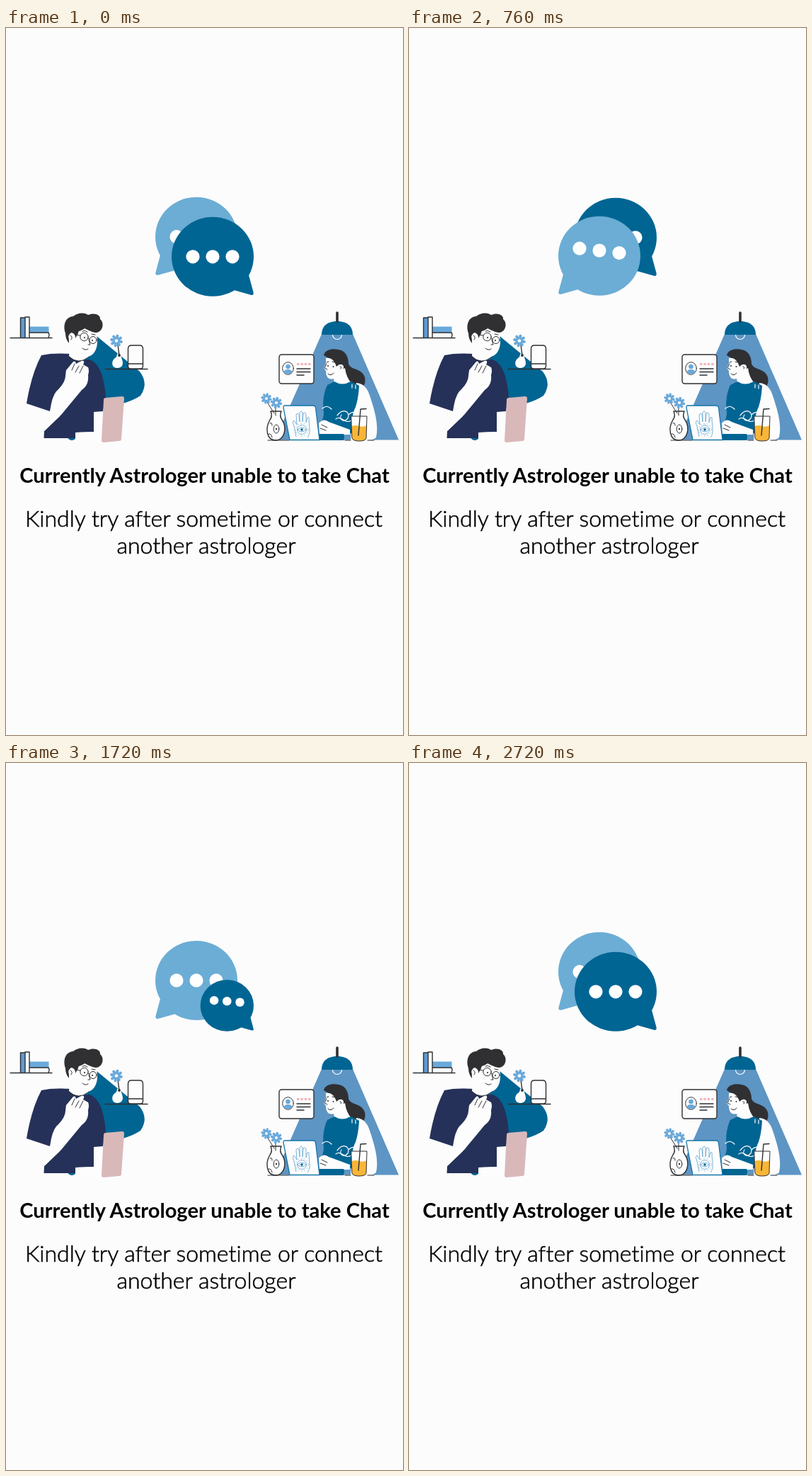
Recreate the animation shown at these times as an HTML page. Size 561 by 998 pixels, loop 2.76 s.

```html
<!DOCTYPE html>
<html lang="en">
<head>
<meta charset="utf-8">
<title>Astrologer unavailable</title>
<style>
  html, body { margin: 0; width: 100%; height: 100%; overflow: hidden; background: #fcfcfc; }
  svg { display: block; width: 100%; height: 100%; }
  text { font-family: Lato, sans-serif; font-variant-ligatures: none; text-anchor: middle; fill: #000; }
  .light { font-weight: 300; stroke: #000; stroke-width: .55; }
  .ink { fill: none; stroke: #2f3033; stroke-width: 1.4; stroke-linecap: round; stroke-linejoin: round; }
  .thin { stroke-width: 1; }
  .paper { fill: #fdfdfd; }
  .hair { fill: #303033; }
  .navy { fill: #253158; }
  .teal { fill: #006593; }
  .sky { fill: #69a9db; }
</style>
</head>
<body>
<svg viewBox="0 0 561 998" xmlns="http://www.w3.org/2000/svg">
  <defs>
    <g id="flower">
      <g id="petals" stroke="#69a9db" stroke-width="4" stroke-linecap="round"></g>
      <circle class="sky" r="4.6"/>
      <circle class="paper" r="2.3"/>
    </g>
  </defs>
  <rect width="561" height="998" fill="#fcfcfc"/>

  <g id="bubbles"></g>

  <g id="man">
    <!-- book shelf -->
    <rect x="20.5" y="409" width="6.500" height="28" fill="#5e9bd3"/>
    <rect class="sky" x="33" y="421.500" width="27.500" height="8.500"/>
    <path class="ink" d="M6 437.500H65M20.500 437V409H27V437M27 408H33V437M33 430H60Q62 433 60 437"/>
    <!-- backdrop -->
    <path class="teal" d="M127 434L189 485Q202 502 190 519Q172 531 139 535L108 468Z"/>
    <path class="teal" d="M87 578H99Q97 582 93 582Q89 582 87 578Z"/>
    <!-- side table -->
    <path class="paper" d="M157 460H163Q162 464 164 468C167 476 163 480 157 480C149 480 148 470 154 466Q157 464 157 460Z"/>
    <rect class="paper" x="172.500" y="448" width="21" height="33" rx="4"/>
    <path class="ink" d="M140 481.500H200M158 447L160 462M172.500 474H193.500M177 448H189Q193.500 448 193.500 453V477Q193.500 481 190 481H176Q172.500 481 172.500 477V453Q172.500 448 177 448"/>
    <circle class="hair" cx="160" cy="462" r="1.900"/>
    <use href="#flower" transform="translate(156 441.500)"/>
    <!-- body -->
    <path class="navy" d="M50 462C62 459 78 459 90 460L104 469L118 468C133 473 139 495 141 521L137 541L124 542V570L98 571V579H53.500L54 569L76 548L62 541L29 530Q36 488 50 462Z"/>
    <path class="paper" d="M91 441L89 463Q102 476 116 465L115 452Z"/>
    <path class="paper" d="M85 483L95 471Q98 469 99 474L108 469Q112 470 109 475L116 479Q118 483 116 490C117 501 113 507 107 511L78 546L54 569Q60 558 62 541Q65 520 71 513Q84 501 84 491Z"/>
    <path class="ink thin" d="M97 474L93 483M103 477L98 486M109 477L104 487M89 464Q102 476 116 465"/>
    <path class="paper" d="M124 542H139L136 584H98V571L124 570Z"/>
    <!-- head -->
    <path class="paper" d="M88 428Q99 412 128 425L129 443C129 454 123 464 114 464Q100 463 91 447Z"/>
    <path class="hair" d="M84 431C80 419 84 408 95 407C101 402 110 401 116 405C125 401 134 405 133 411C139 416 137 426 131 429C125 432 118 427 111 424C107 428 102 426 102 431L98 438Q97 430 92 430Q88 432 89 445Q84 439 84 431Z"/>
    <circle class="paper" cx="93" cy="436" r="4.800"/>
    <g class="ink thin">
      <circle cx="110.500" cy="436" r="5.700"/>
      <circle cx="123" cy="440.500" r="5"/>
      <path d="M98 433L105 434M116 438L118 439M108 428Q111 426 115 429M121 432L126 433M108 452Q112 456 116 453M91 434Q95 436 92 440M117 440L119 447L116 447"/>
    </g>
    <circle class="hair" cx="111" cy="437" r="1.100"/>
    <circle class="hair" cx="122" cy="441" r="1.100"/>
    <!-- folder -->
    <path d="M141 522L164 520Q167 520 167 523L163 580Q163 583 160 583L138 585Q135 585 135 582L138 525Q138 522 141 522Z" fill="#d9b8ba"/>
  </g>

  <g id="woman">
    <!-- lamp -->
    <path d="M446 432H490L555 581.500H380Z" fill="#5d95c4"/>
    <circle cx="468" cy="433" r="6.500" fill="#5d95c4" stroke="#fdfdfd" stroke-width="1.200"/>
    <path class="teal" d="M446 433C446 420 455 414 468 414C481 414 490 420 490 433Z"/>
    <path d="M468 402V414" stroke="#303033" stroke-width="3.600" stroke-linecap="round"/>
    <!-- profile card -->
    <rect class="ink" x="386" y="461" width="49" height="41" rx="3.500" style="fill:#fdfdfd"/>
    <ellipse class="ink thin" cx="398.500" cy="480.500" rx="7.800" ry="8.800" style="fill:#fdfdfd"/>
    <circle class="sky" cx="398.500" cy="478" r="3.300"/>
    <path class="sky" d="M392.500 486Q393 482 398.500 482Q404 482 404.500 486Q399 491 392.500 486Z"/>
    <path d="M411 474.500H431" stroke="#f3b3bc" stroke-width="3.200" stroke-dasharray="3.400 2"/>
    <path class="ink" d="M411 481H430M411 485.500H430M411 490H421"/>
    <!-- figure -->
    <path class="hair" d="M449 462C451 454 461 452 470 454C481 456 484 466 484 474C488 484 502 479 507 493C509 503 505 509 496 508L466 500L462 470Z"/>
    <path class="paper" d="M495 501Q509 502 514 519C521 540 527 560 523 578Q519 582 509 582H487L488 560Z"/>
    <path class="teal" d="M454 504L464 499H488L499 505Q498 523 494 535Q488 546 488 572L479 573L444 560Q449 551 449 543Q446 521 454 504Z"/>
    <path class="paper" d="M462 488L464 501Q475 508 488 501Q481 494 479 480Z"/>
    <path class="paper" d="M452 466Q460 464 465 473L467 478Q473 472 477 477Q478 483 472 484C470 493 464 497 457 495Q452 493 452 484L449 480L452 474Z"/>
    <path class="teal" d="M464 499Q475 506 487 499L490 503Q477 511 463 504Z"/>
    <path class="ink thin" d="M453 472L456 471M461 471L465 472M453 474L450 480L454 482M455 488Q459 492 463 487M472 478Q475 478 473 481"/>
    <circle class="hair" cx="455" cy="477" r="1"/>
    <circle class="hair" cx="462.500" cy="478" r="1"/>
    <g fill="none" stroke="#fdfdfd" stroke-width="1.200" stroke-linecap="round">
      <path d="M447 537Q454 531 460 538M466 552C474 546 479 560 488 554M468 547C476 536 487 541 483 551C477 558 470 552 474 546M484 546Q489 541 494 543M489 503V508M494 504V509"/>
    </g>
    <path class="paper" d="M442 558Q449 550 456 556L486 567V574H443Z"/>
    <path class="ink thin" d="M446 560L454 564M444 565L452 568"/>
    <path class="teal" d="M438 573H477Q479 577 477 582H438Z"/>
    <!-- drink -->
    <path class="paper" d="M488 548H510L509 579Q508 583 499 583Q490 583 489 579Z"/>
    <path d="M488.500 562Q494 560 499 562Q505 564 509.500 561L509 579Q508 583 499 583Q490 583 489 579Z" fill="#f9b537"/>
    <path class="ink thin" d="M488 548H510L509 579Q508 583 499 583Q490 583 489 579Z"/>
    <path class="ink" d="M498 575L501 538L509 537.500"/>
    <!-- vase -->
    <path class="ink" style="fill:#fdfdfd" d="M374 541H389Q386 548 390 553C398 565 393 582 381 582C368 582 366 565 373 553Q377 548 374 541Z"/>
    <path class="ink thin" d="M369 528L379 544M381 536V547M371 573Q375 572 376 578M373 558Q376 556 376 561"/>
    <ellipse class="ink thin" cx="382" cy="566" rx="3.800" ry="6"/>
    <circle class="hair" cx="382" cy="566" r="1.200"/>
    <use href="#flower" transform="translate(368 523) scale(.86)"/>
    <use href="#flower" transform="translate(382 529) scale(.92)"/>
    <!-- laptop -->
    <path d="M394 533H434Q437 533 437.500 536L443 581.500H401L392 536Q391.500 533 394 533Z" fill="#fdfdfd" stroke="#1576a9" stroke-width="1.300"/>
    <g fill="none" stroke="#6ba9d2" stroke-width=".9">
      <path d="M410 577L407 562Q404 555 407 554L411 560L410 546Q412 542 414 546L415 556V543Q417 539 419 543V556L420 544Q423 541 424 546L424 557L426 550Q429 548 428 553L429 565Q430 573 426 578"/>
      <circle cx="418" cy="567" r="6.500"/>
      <circle cx="418" cy="567" r="9" stroke-dasharray="1.500 3"/>
      <path d="M412 567Q418 561 424 567Q418 573 412 567"/>
    </g>
    <circle class="teal" cx="418" cy="567" r="1.800"/>
    <path class="ink thin" d="M370 582H400M479 582H487M511 582H520"/>
  </g>

  <text x="280.500" y="642" font-size="29.100" font-weight="700">Currently Astrologer unable to take Chat</text>
  <g class="light" font-size="32.100">
    <text x="279.500" y="703.500">Kindly try after sometime or connect</text>
    <text x="283" y="741.500">another astrologer</text>
  </g>
</svg>
<script>
const NS = 'http://www.w3.org/2000/svg';
const LOOP = 2760, STEP = 40, SWAP = 1600, LIFT = 27;
const stage = document.getElementById('bubbles');

function add(parent, tag, attrs = {}) {
  const el = document.createElementNS(NS, tag);
  for (const key in attrs) el.setAttribute(key, attrs[key]);
  return parent.appendChild(el);
}

for (let i = 0; i < 8; i++) {
  add(document.getElementById('petals'), 'path', { d: 'M0 -4V-7', transform: `rotate(${i * 45 + 12})` });
}

// side: 1 puts the tail on the right, -1 on the left
function makeBubble(x, y, side, fill) {
  const el = add(stage, 'g');
  const shape = add(el, 'g', { fill, transform: `scale(${side} 1)` });
  add(shape, 'ellipse', { rx: 58, ry: 56 });
  add(shape, 'path', { d: 'M51 26L57.5 50Q58.5 55 54 54L22 45Z' });
  const dots = [-28, 0, 28].map(cx => add(el, 'circle', { cx, r: 9.6, fill: '#fff' }));
  return { el, dots, x, y, side };
}

const ghost = makeBubble(269, 321.7, -1, '#6badd5');
const light = makeBubble(269, 321.7, -1, '#6badd5');
const dark = makeBubble(292, 322.8, 1, '#006593');

const clamp = v => Math.min(1, Math.max(0, v));
const easeOut = v => 1 - Math.pow(1 - clamp(v), 1.5);

// The bubble grows out of the tip of its tail
function pose(b, lift, scale, hop) {
  const ax = 58 * b.side, ay = 56, k = 1 - scale;
  b.el.setAttribute('transform', `translate(${b.x + ax * k} ${b.y + ay * k - lift}) scale(${scale})`);
  b.dots.forEach((dot, i) => dot.setAttribute('cy', hop ? hop(i) : 0));
}

// Two waves run over the three dots
function wave(time) {
  const lag = 48 * clamp(time / 300);
  return i => {
    const turn = clamp((time - i * lag) / 1040) * 2;
    return -6 * (1 - Math.cos(2 * Math.PI * turn));
  };
}

function render(ms) {
  const t = Math.floor((ms % LOOP) / STEP) * STEP;
  const second = t >= SWAP;
  const [front, back] = second ? [dark, light] : [light, dark];
  const grow = t - (second ? 1506 : 40);
  const rise = LIFT * easeOut((t - (second ? 1560 : 40)) / 390);

  if (stage.lastChild !== front.el) stage.append(front.el);
  pose(front, 0, easeOut(grow / 425), wave(grow));
  pose(back, rise, 1);
  pose(ghost, LIFT + rise, 1);
  ghost.el.setAttribute('opacity', second ? 0 : 1 - clamp(grow / 250) ** 2);
}

const start = performance.now();
function tick() {
  render(performance.now() - start);
  requestAnimationFrame(tick);
}
tick();
</script>
</body>
</html>
```
